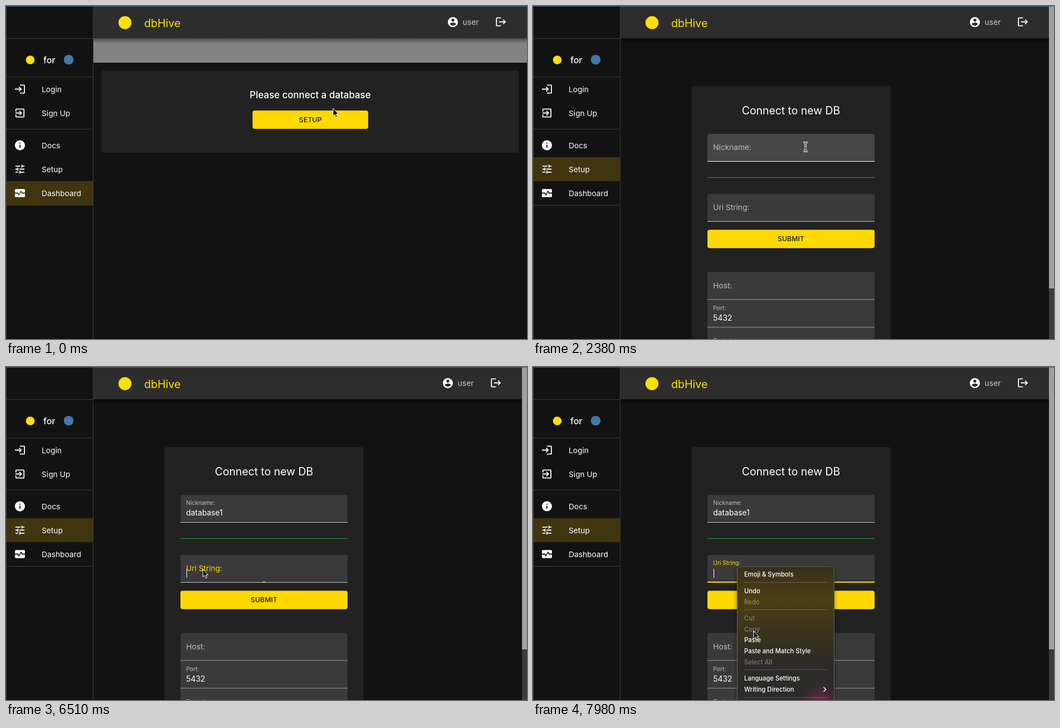
Write an HTML page that moves like this. It is 935 by 599 pixels and loops after 8 s.

```html
<!DOCTYPE html>
<html lang="en">
<head>
<meta charset="utf-8">
<title>Database setup</title>
<style>
  html, body { margin: 0; width: 100%; height: 100%; overflow: hidden; background: #121212; }
  svg { display: block; width: 100vw; height: 100vh; }
  text { font-family: Inter, Roboto, "Liberation Sans", sans-serif; font-optical-sizing: none; white-space: pre; }
</style>
</head>
<body>
<svg id="stage" viewBox="0 0 935 599"></svg>
<script>
const LOOP = 8000;
const YELLOW = '#ffd900', GREY = '#bdbdbd', FIELD = '#3a3a3a';
const stage = document.getElementById('stage');
const $ = id => document.getElementById(id);

const rect = (x, y, w, h, fill, more = '') =>
  `<rect x="${x}" y="${y}" width="${w}" height="${h}" fill="${fill}" ${more}/>`;
const text = (x, y, size, fill, str, more = '') =>
  `<text x="${x}" y="${y}" font-size="${size}" fill="${fill}" ${more}>${str}</text>`;
const icon = (x, y, d) =>
  `<path transform="translate(${x - 10.8} ${y - 10.8}) scale(.9)" fill="#fff" d="${d}"/>`;

const ICONS = {
  login: 'M11 7L9.6 8.4l2.6 2.6H2v2h10.2l-2.6 2.6L11 17l5-5-5-5zm9 12h-8v2h8c1.1 0 2-.9 2-2V5c0-1.1-.9-2-2-2h-8v2h8v14z',
  signUp: 'M10.09 15.59L11.5 17l5-5-5-5-1.41 1.41L12.67 11H3v2h9.67l-2.58 2.59zM19 3H5c-1.11 0-2 .9-2 2v4h2V5h14v14H5v-4H3v4c0 1.1.89 2 2 2h14c1.1 0 2-.9 2-2V5c0-1.1-.9-2-2-2z',
  docs: 'M12 2C6.48 2 2 6.48 2 12s4.48 10 10 10 10-4.48 10-10S17.52 2 12 2zm1 15h-2v-6h2v6zm0-8h-2V7h2v2z',
  setup: 'M3 17v2h6v-2H3zM3 5v2h10V5H3zm10 16v-2h8v-2h-8v-2h-2v6h2zM7 9v2H3v2h4v2h2V9H7zm14 4v-2H11v2h10zm-6-4h2V7h4V5h-4V3h-2v6z',
  dashboard: 'M4 4h16c1.1 0 2 .9 2 2v5h-5.4L15 7.8c-.4-.8-1.5-.8-1.8 0L10 14.3 8.9 12c-.2-.5-.5-1-1-1H2V6c0-1.1.9-2 2-2zM2 13h5.4L9 16.2c.4.8 1.5.8 1.8 0L14 9.7l1.1 2.3c.2.5.5 1 1 1H22v5c0 1.1-.9 2-2 2H4c-1.1 0-2-.9-2-2z',
  account: 'M12 2C6.48 2 2 6.48 2 12s4.48 10 10 10 10-4.48 10-10S17.52 2 12 2zm0 3c1.66 0 3 1.34 3 3s-1.34 3-3 3-3-1.34-3-3 1.34-3 3-3zm0 14.2c-2.5 0-4.71-1.28-6-3.22.03-1.99 4-3.08 6-3.08 1.99 0 5.97 1.09 6 3.08-1.29 1.94-3.5 3.22-6 3.22z',
  logout: 'M17 7l-1.41 1.41L18.17 11H8v2h10.17l-2.58 2.58L17 17l5-5zM4 5h8V3H4c-1.1 0-2 .9-2 2v14c0 1.1.9 2 2 2h8v-2H4V5z'
};

const navItem = (y, key, label) => icon(25, y, ICONS[key]) + text(64, y + 5, 13.75, '#fff', label);

const button = (id, x, y, w, label) =>
  rect(x, y, w, 33, YELLOW, `id="${id}" rx="4" filter="url(#lift)"`) +
  text(x + w / 2, y + 20.7, 12.2, '#1d1a08', label, 'text-anchor="middle" font-weight="500" letter-spacing=".15"');

const field = (id, y, label, small) =>
  `<path id="${id}Box" fill="${FIELD}" d="M313 ${y + 49.5}V${y + 4}q0-4 4-4H609q4 0 4 4V${y + 49.5}z"/>` +
  rect(313, y + 49, 300, 1, '#c6c6c6', `id="${id}Line"`) +
  rect(313, y + 48, 0, 2, YELLOW, `id="${id}Focus"`) +
  text(323.3, y + (small ? 18 : 29), small ? 10.3 : 13.7, GREY, label, `id="${id}Label"`) +
  text(323.3, y + 37, 13.85, '#fff', '', `id="${id}Text"`) +
  rect(324, y + 25, 1, 16, '#fff', `id="${id}Caret" visibility="hidden"`);

const MENU = [
  [373, 'Emoji &amp; Symbols'], [403, 'Undo'], [422.5, 'Redo', 1], [452, 'Cut', 1],
  [471.7, 'Copy', 1], [491.3, 'Paste'], [511, 'Paste and Match Style'],
  [530.7, 'Select All', 1], [560.2, 'Language Settings'], [579.8, 'Writing Direction']
];

const sidebar =
  rect(0, 0, 156, 599, '#121212') +
  rect(0, 272, 156, 43, '#3f360f', 'id="rowSetup"') +
  rect(0, 315, 156, 43, '#3f360f', 'id="rowDash"') +
  [58, 127, 221, 358].map(y => rect(0, y, 156, 1, '#3a3a3a')).join('') +
  rect(156, 0, 1, 599, '#3a3a3a') +
  `<circle cx="43.5" cy="97" r="7.8" fill="#ffe000"/><circle cx="112.5" cy="96.5" r="8.7" fill="#4379a8"/>` +
  text(67, 102.5, 16, '#fff', 'for', 'font-weight="500"') +
  navItem(149.5, 'login', 'Login') + navItem(192.5, 'signUp', 'Sign Up') +
  navItem(250.5, 'docs', 'Docs') + navItem(293.5, 'setup', 'Setup') +
  navItem(336.5, 'dashboard', 'Dashboard');

const header =
  rect(157, 0, 778, 58, '#2d2d2d') + rect(157, 58, 778, 9, 'url(#shade)') +
  '<circle cx="213.5" cy="30" r="11.7" fill="#ffe000"/>' +
  text(248, 37.5, 19.6, '#ffe000', 'dbHive') +
  `<g id="account">${icon(802, 29, ICONS.account)}${text(819.5, 34, 14, '#c4c4c4', 'user')}${icon(888.3, 28.5, ICONS.logout)}</g>`;

const dashboard =
  rect(157, 58, 778, 44, '#828282') +
  rect(171.5, 116, 749, 148, '#222', 'rx="4"') +
  text(546, 165.5, 16.9, '#fff', 'Please connect a database', 'text-anchor="middle" font-weight="500"') +
  button('start', 442.5, 188, 207.5, 'SETUP') +
  '<circle id="ripple" cx="579" cy="205" fill="#000" fill-opacity=".12" clip-path="url(#startClip)"/>';

const form =
  rect(284.5, 144, 357, 470, '#222', 'rx="4"') +
  text(463, 194.5, 19.4, '#fff', 'Connect to new DB', 'text-anchor="middle"') +
  field('nick', 230, 'Nickname:') +
  rect(313, 308, 300, 1, '#2f9a3f') +
  field('uri', 338, 'Uri String:') +
  button('submit', 313, 402.5, 300, 'SUBMIT') +
  field('host', 478.5, 'Host:') + field('port', 528.5, 'Port:', true) + field('base', 578.5, 'Database:');

const scrollbar = rect(926, 0, 9, 599, '#3c3c3c') + rect(926, 0, 9, 508, '#a0a0a0');

const menu =
  rect(366.5, 359, 174, 260, '#2b2a27', 'rx="6" filter="url(#drop)"') +
  rect(366.5, 359, 174, 260, 'url(#tint)', 'rx="6" stroke="#6a675c"') +
  rect(470, 560, 70, 39, 'url(#glow)') +
  [387, 436, 544, 594].map(y => rect(379, y, 149, 1, '#fff', 'fill-opacity=".22"')).join('') +
  MENU.map(([y, str, off]) =>
    text(379, y + 4.1, 11.2, '#fff', str, `font-weight="500" fill-opacity="${off ? .36 : 1}"`)).join('') +
  '<path d="M521.5 576l4 4-4 4" fill="none" stroke="#fff" stroke-width="1.5"/>';

const cursors =
  `<path id="arrow" d="M0 0V14L3.1 11.1 5.2 16.2 7.4 15.2 5.3 10.3H9.4Z" fill="#000" stroke="#fff"/>
   <path id="hand" d="M-1.5 8V1.2C-1.5-.4 1.3-.4 1.3 1.2V5.5C2 4.6 4 4.8 4.2 6 5 5.2 6.8 5.6 7 6.8 8.2 6.3 9 7 9 8.2V10.5C9 12.5 7.8 13.5 7.6 15H0C-.5 13-3.5 11-4.8 9-5.6 7.6-3.8 6.6-2.6 7.6Z" fill="#fff" stroke="#000"/>
   <g id="beam" fill="none"><path id="beamPath" d="M-3.5-8Q0-8 0-6Q0-8 3.5-8M0-6V6M-3.5 8Q0 8 0 6Q0 8 3.5 8M-2 2H2" stroke="#fff" stroke-width="2.8"/><use href="#beamPath"/>
   <path d="M-3.5-8Q0-8 0-6Q0-8 3.5-8M0-6V6M-3.5 8Q0 8 0 6Q0 8 3.5 8M-2 2H2" stroke="#000"/></g>`;

stage.innerHTML = `<defs>
  <linearGradient id="shade" x2="0" y2="1"><stop stop-color="#000" stop-opacity=".42"/><stop offset="1" stop-color="#000" stop-opacity="0"/></linearGradient>
  <linearGradient id="tint" x2="0" y2="1"><stop stop-color="#35301c"/><stop offset=".22" stop-color="#4b3f12"/><stop offset=".46" stop-color="#39331d"/><stop offset=".68" stop-color="#2c2b28"/><stop offset="1" stop-color="#2b2b2b"/></linearGradient>
  <radialGradient id="glow" gradientUnits="userSpaceOnUse" cx="517" cy="602" r="34"><stop stop-color="#9c1f5c" stop-opacity=".6"/><stop offset="1" stop-color="#9c1f5c" stop-opacity="0"/></radialGradient>
  <filter id="lift" x="-5%" y="-20%" width="110%" height="160%"><feDropShadow dx="0" dy="1.5" stdDeviation="1.5" flood-opacity=".45"/></filter>
  <filter id="drop" x="-10%" y="-10%" width="120%" height="120%"><feDropShadow dx="0" dy="3" stdDeviation="4" flood-opacity=".5"/></filter>
  <clipPath id="startClip">${rect(442.5, 188, 207.5, 33, '#000', 'rx="4"')}</clipPath></defs>` +
  rect(0, 0, 935, 599, '#121212') +
  `<g id="pageDash">${dashboard}</g><g id="pageForm">${form}</g>` + header + sidebar +
  `<g id="scroll">${scrollbar}</g>` +
  rect(0, 0, 935, 1, '#42658c') + rect(0, 0, 1, 599, '#3a4048') +
  `<g id="menu">${menu}</g>` + cursors;
$('portText').textContent = '5432';

const clamp = p => Math.max(0, Math.min(1, p));
const ramp = (t, start, len) => clamp((t - start) / len);
const smooth = p => p * p * (3 - 2 * p);
const easeOut = p => 1 - (1 - p) ** 3;
const mix = (a, b, p) => a + (b - a) * p;
const show = (id, on) => $(id).setAttribute('visibility', on ? 'visible' : 'hidden');
const set = (id, attrs) => { for (const k in attrs) $(id).setAttribute(k, attrs[k]); };

const OPEN = 1470, NICK = 2520, TYPE = 3710, BACK = 5740, URI = 6510, MENU_AT = 7210;

// time, x, y
const TRACK = [
  [0, 587, 184], [35, 587, 184], [70, 582, 191], [200, 582, 192], [420, 579, 205.5],
  [1960, 579, 205.5], [2380, 489, 253.5], [5739, 489, 253.5], [BACK, 106, 276],
  [6370, 352, 364], [6440, 352, 364], [6790, 364.5, 360], [7280, 364.5, 360], [7980, 396, 475]
];
// times at which each character appears
const KEYS = [TYPE, 3920, 3990, 4130, 4340, 4550, 4690, 4830, 5180];

function pointer(t) {
  const i = TRACK.findIndex(k => k[0] > t);
  if (i < 0) return TRACK[TRACK.length - 1].slice(1);
  const [t0, x0, y0] = TRACK[i - 1], [t1, x1, y1] = TRACK[i];
  const p = smooth((t - t0) / (t1 - t0));
  return [mix(x0, x1, p), mix(y0, y1, p)];
}

function drawField(id, y, t, focus, blur, filled) {
  const on = t >= focus && t < blur;
  const up = easeOut(ramp(t, focus, 200));
  const grow = on ? easeOut(ramp(t, focus, 200)) : 0;
  set(id + 'Label', { y: mix(y + 29, y + 18, up), 'font-size': mix(13.7, 10.3, up), fill: on ? YELLOW : GREY });
  set(id + 'Focus', { x: 463 - 150 * grow, width: 300 * grow });
  $(id + 'Text').textContent = filled;
  const w = filled ? $(id + 'Text').getComputedTextLength() : 0;
  set(id + 'Caret', { x: Math.round(323.5 + w) });
}

function draw(t) {
  const onForm = t >= OPEN;
  show('pageDash', !onForm);
  show('pageForm', onForm);
  show('scroll', onForm);
  set('account', { transform: `translate(${onForm ? -9 : 0} 0)` });
  const fade = ramp(t, OPEN, 150);
  set('rowSetup', { opacity: fade });
  set('rowDash', { opacity: 1 - fade });

  set('start', { fill: t >= 560 ? '#e2c305' : YELLOW });
  set('ripple', { r: 105 * smooth(ramp(t, 1300, 550)) });

  const [x, y] = pointer(t);
  const overNick = onForm && t < TYPE && y > 230;
  const hover = overNick && t < NICK;
  set('nickBox', { fill: hover ? '#474747' : FIELD });
  set('nickLine', { fill: hover ? '#fff' : '#c6c6c6' });

  drawField('nick', 230, t, NICK, URI, 'database1'.slice(0, KEYS.filter(k => k <= t).length));
  drawField('uri', 338, t, URI, LOOP + 1, '');
  const off = (a, b) => t >= a && t < b;
  show('nickCaret', t >= 2590 && t < URI && !off(3220, TYPE) && !off(5700, 6240));
  show('uriCaret', t >= URI && !off(7040, MENU_AT));
  show('menu', t >= MENU_AT);

  const kind = t >= TYPE && t < BACK ? '' : overNick ? 'beam' : t >= 210 && !onForm ? 'hand' : 'arrow';
  for (const id of ['arrow', 'hand', 'beam']) {
    show(id, id === kind);
    set(id, { transform: `translate(${x} ${y})` });
  }
}

function tick() {
  draw(performance.now() % LOOP);
  requestAnimationFrame(tick);
}
tick();
</script>
</body>
</html>
```
